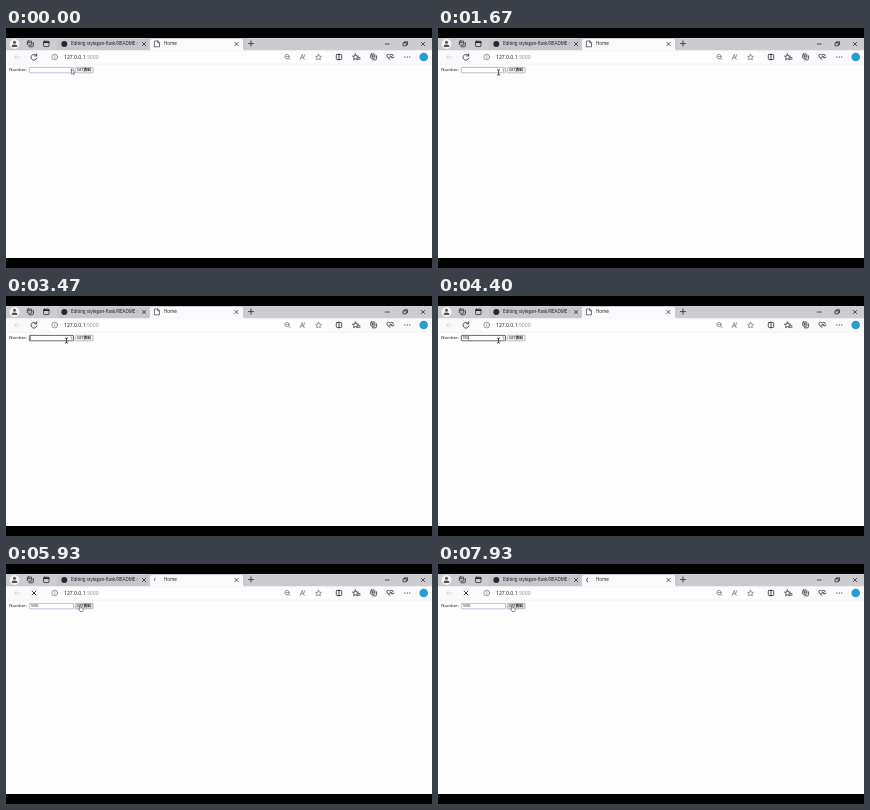
An HTML page for the animation above (8 s loop, 426 by 240 pixels).

```html
<!DOCTYPE html>
<html lang="en">
<head>
<meta charset="utf-8">
<title>Browser form</title>
<style>
html, body { margin: 0; width: 100%; height: 100%; overflow: hidden; background: #000; }
svg { display: block; width: 100%; height: 100%; }
text { font-family: "Open Sans", "Noto Sans", sans-serif; fill: #111; }
.line { fill: none; stroke: #444; stroke-width: .75; stroke-linecap: round; stroke-linejoin: round; }
.soft { stroke: #777; }
.dark { stroke: #222; }
.cjk { font-family: "Open Sans", "Noto Sans CJK TC", "Noto Sans CJK", sans-serif; }
</style>
</head>
<body>
<svg viewBox="0 0 426 240">
  <defs>
    <path id="cross" d="M-1.6-1.6 1.6 1.6M1.6-1.6-1.6 1.6"/>
    <path id="star" d="M0-3 .9-1 3-.8 1.4.6 1.9 2.7 0 1.6-1.9 2.7-1.4.6-3-.8-.9-1Z"/>
  </defs>

  <rect width="426" height="240"/>
  <rect y="10" width="426" height="220" fill="#fdfdfd"/>

  <!-- tab strip -->
  <rect y="10" width="426" height="12.5" fill="#cccbd0"/>
  <path d="M51 22V13q0-2 2-2h88q2 0 2 2v9Z" fill="#c8c6cc"/>
  <path d="M142 23q2 0 2-2v-8q0-2 2-2h89q2 0 2 2v8q0 2 2 2Z" fill="#faf9fb"/>
  <circle cx="8.5" cy="16" r="5" fill="#f4f3f6"/>
  <circle cx="8.5" cy="14.3" r="1.5" fill="#555"/>
  <path d="M5.7 19q0-2.4 2.8-2.4t2.8 2.4Z" fill="#555"/>
  <g class="line dark">
    <rect x="21.3" y="13" width="4.6" height="4.2" rx="1"/>
    <path d="M23 18.8h3q1.5 0 1.5-1.5v-2.5M21.5 14.7h4"/>
    <rect x="37.6" y="13.2" width="5.4" height="5.4" rx=".8"/>
    <path d="M37.8 14.3h5" stroke-width="1.6"/>
  </g>
  <circle cx="58.3" cy="16" r="3" fill="#24292f"/>
  <text x="65" y="17.4" font-size="4.55">Editing stylegan-flask/README<tspan fill="#8b8890">.r</tspan></text>
  <text x="158" y="17.4" font-size="4.5">Home</text>
  <g class="line dark">
    <use href="#cross" x="138" y="16"/>
    <use href="#cross" x="230.5" y="16"/>
    <path d="M242.4 15.6h5.2M245 13v5.2M379.3 16h4"/>
    <path d="M397.4 14.8h3v3h-3ZM398.5 14.7v-1h3v3h-1"/>
    <use href="#cross" x="417" y="16"/>
  </g>
  <path id="page" class="line" d="M148.8 13h2.9l1.8 1.8v4h-4.7ZM151.7 13v1.8h1.8" stroke-width=".65"/>
  <path id="spinner" class="line dark" d="M-2.7 0A2.7 2.7 0 0 1 0-2.7" pathLength="1"/>

  <!-- toolbar -->
  <rect y="22.5" width="426" height="13.5" fill="#faf9fb"/>
  <path d="M0 36.2h426" stroke="#eeedf3" stroke-width=".6"/>
  <rect x="41" y="24" width="285" height="11" rx="5.5" fill="#fefefe"/>
  <path class="line" d="M14 29H8.5l2.3-2.3M8.5 29l2.3 2.3" stroke-opacity=".2"/>
  <path id="reload" class="line dark" d="M30.3 27.5A2.9 2.9 0 1 0 30.8 30M30.7 25.8v2.1h-2.1"/>
  <use id="stop" class="line dark" href="#cross" transform="translate(28 29) scale(1.2)"/>
  <g class="line soft">
    <circle cx="48.7" cy="29" r="2.9"/>
    <path d="M48.7 28.8v1.5M48.7 27.5v.05"/>
    <circle cx="281" cy="28.6" r="2.2"/>
    <path d="M282.7 30.3l1.4 1.4M280 28.6h2"/>
    <path d="M294.2 31.5l2-5 2 5M295 29.8h2.5M298.4 26.3q1.3.8 0 2.2"/>
    <use href="#star" x="312.5" y="29.2"/>
  </g>
  <text x="58" y="31" font-size="5.1">127.0.0.1<tspan fill="#8a8a8e">:5000</tspan></text>
  <g class="line dark">
    <rect x="330.3" y="26.5" width="5.4" height="5" rx=".8"/>
    <path d="M333 26v6"/>
    <use href="#star" x="349.5" y="29"/>
    <path d="M352 31.2h2M352.5 29.7h1.5"/>
    <rect x="364.7" y="26" width="4.2" height="4.2" rx=".8"/>
    <path d="M366.3 31.8h3q1.3 0 1.3-1.3v-2.7M366.8 27.2v1.8M365.9 28.1h1.8"/>
    <path d="M384 31.5q-3.2-2.1-3.2-3.7 0-1.5 1.5-1.5 1 0 1.7 1 .7-1 1.8-1 1.5 0 1.5 1.5M383 29.3h1.3l.8-1.3 1 2.3.7-1h1"/>
    <path d="M398.9 29h.05M401.3 29h.05M403.7 29h.05" stroke-width="1.2"/>
  </g>
  <circle cx="417.7" cy="29" r="4.3" fill="#269fd0"/>

  <!-- form -->
  <text x="3.3" y="43.3" font-size="4.25">Number:</text>
  <rect id="field" x="23.3" y="39.4" width="44.2" height="5.4" rx=".4" fill="#fff" stroke-width=".7"/>
  <text id="value" x="24.3" y="43.4" font-size="3.5"></text>
  <path id="caret" d="M24.5 40.3v3.7" stroke="#222" stroke-width=".5"/>
  <g id="arrows">
    <rect x="64" y="40" width="3" height="4.2" fill="#ececef"/>
    <path d="M64.7 41.6l.8-.9.8.9ZM64.7 42.7l.8.9.8-.9Z" fill="#555"/>
  </g>
  <rect id="button" x="69.3" y="39.3" width="17.8" height="5.6" rx=".8" stroke="#9c9ba2" stroke-width=".6"/>
  <text class="cjk" x="71" y="43.4" font-size="3.6">GET<tspan font-weight="700">資料</tspan></text>

  <!-- pointers -->
  <path id="arrow" d="M0 0v5l1.2-1 .8 1.7.8-.4-.8-1.6h1.5Z" fill="#fff" stroke="#222" stroke-width=".45"/>
  <path id="beam" class="line dark" d="M-1.2-2.5h.8l.4.4.4-.4h.8M0-2.1v4.2M-1.2 2.5h.8l.4-.4.4.4h.8" stroke-width=".6"/>
  <path id="hand" d="M-.6 2V-.2q0-.7.6-.7t.6.7v1.5l1.8.4q.6.2.6.8L2.5 5h-2.8L-1.8 2.8q.4-.9 1.2 0Z" fill="#fff" stroke="#222" stroke-width=".45"/>
</svg>
<script>
const LOOP = 8000, STEP = 200 / 3;
const FOCUS = 2000, TYPE = 3870, KEY = 200, CLICK = 5670;
const DIGIT = 2;
const el = {};
document.querySelectorAll("[id]").forEach(n => el[n.id] = n);

const show = (node, on) => node.setAttribute("visibility", on ? "visible" : "hidden");
const set = (node, name, value) => node.setAttribute(name, value);
const ease = u => u * u * (3 - 2 * u);

// time, x, y
const path = [[0, 65.5, 41], [1200, 65.5, 41], [1700, 60.5, 44.5],
              [4950, 60.5, 44.5], [5400, 74.3, 42.5], [LOOP, 74.3, 42.5]];

function pointerAt(t) {
  const i = path.findIndex(p => p[0] > t);
  const [t0, x0, y0] = path[i - 1], [t1, x1, y1] = path[i];
  const u = ease((t - t0) / (t1 - t0));
  return [x0 + (x1 - x0) * u, y0 + (y1 - y0) * u];
}

// The waiting arc turns counter-clockwise and grows to a quarter circle.
function spin(t) {
  const arc = Math.min(1, .2 + Math.max(0, t - CLICK) / 1000);
  set(el.spinner, "stroke-dasharray", `${arc} 2`);
  set(el.spinner, "transform", `translate(151.3 16) rotate(${(CLICK - t) * .38 + 70})`);
}

function render(time) {
  const t = Math.floor(time / STEP + .01) * STEP;
  const [x, y] = pointerAt(t);
  const focused = t >= FOCUS && t < CLICK;
  const loading = t >= CLICK;
  const overField = x < 67.5;
  const overButton = x > 69.3;
  const typed = t < TYPE ? 0 : Math.min(4, 1 + Math.floor((t - TYPE) / KEY));

  set(el.field, "stroke", focused ? "#292929" : t < 400 ? "#a3a0e2" : loading ? "#aaa8d2" : "#a19f9f");
  el.value.textContent = "1000".slice(0, typed);
  set(el.caret, "transform", `translate(${typed * DIGIT} 0)`);
  show(el.caret, focused && (t - FOCUS) % 1060 < 560);
  show(el.arrows, overField || focused);
  set(el.button, "fill", overButton ? "#d9d8de" : "#efeff2");

  const onText = overField && x < 64;
  show(el.beam, onText);
  show(el.hand, overButton);
  show(el.arrow, !onText && !overButton);
  for (const p of [el.beam, el.hand, el.arrow]) set(p, "transform", `translate(${x} ${y})`);

  show(el.page, !loading);
  show(el.reload, !loading);
  show(el.stop, loading);
  show(el.spinner, loading);
  spin(t);
}

function tick(now) {
  render(now % LOOP);
  requestAnimationFrame(tick);
}
render(0);
requestAnimationFrame(tick);
</script>
</body>
</html>
```
